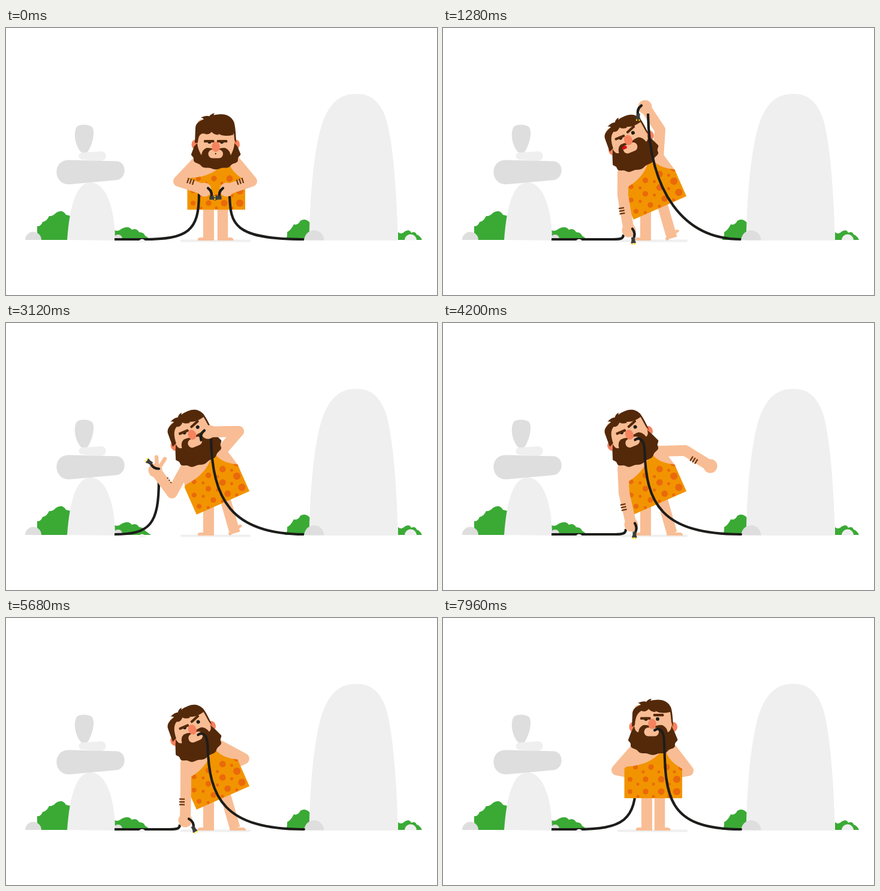
An HTML page with a canvas for the animation above (8 s loop, 719x446 px).

```html
<!DOCTYPE html>
<html lang="en">
<head>
<meta charset="utf-8">
<title>Caveman with cables</title>
<style>
html, body { margin: 0; width: 100%; height: 100%; overflow: hidden; background: #fff; }
canvas { display: block; width: 719px; height: 446px; }
</style>
</head>
<body>
<canvas></canvas>
<script>
const LOOP = 8000, GROUND = 353;
const SKIN = '#f8bd94', BLUSH = '#f5835f', HAIR = '#53290a', INK = '#1d1d1b', METAL = '#3c3c3b';
const TUNIC = '#f29400', SPOT = '#ea690b', BUSH = '#3aaa35', PALE = '#efefef', GREY = '#dedede';

const START = {
  lean: 0, down: 1, look: 0, eye: 0, tap: 0, fingers: 0, plugTurn: 1.25,
  elbowL: [288, 256], handL: [331, 270], elbowR: [410, 256], handR: [368, 270],
};
// Each move eases some properties to new values between two times.
const MOVES = [
  [150, 750, { lean: 1, down: 0, eye: 1, tap: 1, look: -3, plugTurn: 1.5,
    elbowL: [300, 280], handL: [310, 338], elbowR: [362, 170], handR: [337, 132] }],
  [1700, 2300, { look: 0, elbowR: [388, 181], handR: [337, 182] }],
  [2560, 2900, { fingers: 1, plugTurn: 3.75, elbowL: [277, 284], handL: [249, 246] }],
  [3380, 3750, { fingers: 0, tap: 0, plugTurn: 1.6, elbowL: [302, 284], handL: [314, 337] }],
  [3420, 3800, { look: 1, elbowR: [404, 178], handR: [440, 138] }],
  [3800, 4160, { elbowR: [404, 213], handR: [446, 239] }],
  [4240, 4700, { plugTurn: 1.1, elbowL: [300, 285], handL: [299, 338], elbowR: [397, 235], handR: [365, 250] }],
  [5950, 6450, { lean: 0, eye: 0, look: 0, elbowL: [290, 254], handL: [331, 262], elbowR: [409, 255], handR: [370, 262] }],
  [7500, 7850, { look: -2, eye: 1 }],
];

const canvas = document.querySelector('canvas');
const ctx = canvas.getContext('2d');
const ratio = window.devicePixelRatio || 1;
canvas.width = 719 * ratio;
canvas.height = 446 * ratio;

const mix = (a, b, k) => Array.isArray(a) ? a.map((v, i) => mix(v, b[i], k)) : a + (b - a) * k;
const between = (t, a, b) => t >= a && t < b;

function poseAt(t) {
  const pose = { ...START };
  for (const [from, to, changes] of MOVES) {
    const k = Math.min(1, Math.max(0, (t - from) / (to - from)));
    for (const name in changes) pose[name] = mix(pose[name], changes[name], k * k * (3 - 2 * k));
  }
  return pose;
}

function fill(path, color) {
  ctx.fillStyle = color;
  ctx.fill(new Path2D(path));
}
function stroke(path, color, width, cap = 'round') {
  Object.assign(ctx, { strokeStyle: color, lineWidth: width, lineCap: cap, lineJoin: 'round' });
  ctx.stroke(new Path2D(path));
}
function oval(x, y, rx, ry, color) {
  ctx.fillStyle = color;
  ctx.beginPath();
  ctx.ellipse(x, y, rx, ry, 0, 0, 7);
  ctx.fill();
}
function mound(x, y, r, color) {
  fill(`M${x - r} ${y}A${r} ${r} 0 0 1 ${x + r} ${y}Z`, color);
}
function box(x, y, w, h, r, color) {
  ctx.fillStyle = color;
  ctx.beginPath();
  ctx.roundRect(x, y, w, h, r);
  ctx.fill();
}

// A frame turned around a pivot that sits at (x, y) on the stage.
function frame(x, y, angle, pivotX, pivotY) {
  const cos = Math.cos(angle), sin = Math.sin(angle);
  return {
    point(px, py) {
      const dx = px - pivotX, dy = py - pivotY;
      return [x + dx * cos - dy * sin, y + dx * sin + dy * cos];
    },
    draw(part) {
      ctx.save();
      ctx.translate(x, y);
      ctx.rotate(angle);
      ctx.translate(-pivotX, -pivotY);
      part();
      ctx.restore();
    },
  };
}

function scenery() {
  fill('M52 354V331Q58 332 61 324Q68 323 72 314Q78 315 83 309Q94 302 100 312L108 314V354Z', BUSH);
  fill('M181 354V338Q188 340 192 336Q204 329 210 337Q218 334 222 341Q230 341 232 347L242 354Z', BUSH);
  fill('M465 354Q470 350 469 341Q476 337 480 328Q487 330 491 322Q499 317 507 325V354Z', BUSH);
  fill('M654 354V341Q660 346 665 340Q673 335 676 342Q683 339 685 345Q691 347 694 354Z', BUSH);
  mound(187, 352, 7, GREY);
  fill('M102 354C106 298 117 258 141 258C168 258 182 305 182 355Z', PALE);
  fill('M119 164C126 160 138 161 143 165C149 171 146 190 137 206C134 210 127 210 123 205C114 192 112 172 119 164Z', GREY);
  fill('M128 208L158 206C170 206 169 222 158 222L128 220C119 219 120 208 128 208Z', PALE);
  fill('M105 220.5L185 222.5C202 224 202 251 185 254L108 261C78 264 76 220 105 220.5Z', GREY);
  fill('M506 355C507 270 516 180 533 146C546 119 562 110 585 110C608 110 622 122 632 146C645 180 652 270 654 355Z', PALE);
  mound(45.5, 354, 13.5, GREY);
  mound(514, 354.5, 16.5, GREY);
  mound(675, 354.5, 10, PALE);
  box(291, 353.5, 117, 4, 2, PALE);
}

function legs({ lean, tap, down }) {
  const left = mix(340, 338, Math.max(lean, down));
  fill(`M${left - 9} 285H${left + 9}V355H${left - 18}Q${left - 19} 350 ${left - 14} 350H${left - 9}Z`, SKIN);
  const ankle = mix(361.5, 382, lean);
  stroke(`M${mix(361.5, 364.5, lean)} 290L${ankle} 351`, SKIN, 17.5, 'butt');
  frame(ankle - 8, 355, -.66 * tap, 0, 0).draw(() => fill('M-.7 0V-5H21Q26 -5 26 0Z', SKIN));
}

function tunic() {
  const cloth = 'M302.5 301V254Q302 249 308 248Q345 246 365 222H372Q376 239 399 252V301Z';
  fill(cloth, TUNIC);
  ctx.save();
  ctx.clip(new Path2D(cloth));
  for (let row = 0; row < 3; row++) {
    for (let col = 0; col < 4; col++) {
      const x = 312 + 26 * col + (row ? 0 : 9), y = 249 + 20.5 * row, r = 4 + .7 * col;
      oval(x, y, r, r, SPOT);
      oval(x + 13, y + 8, 2.5, 2.5, SPOT);
    }
  }
  ctx.restore();
}

function arm(points) {
  const [x, y] = points[points.length - 1];
  stroke('M' + points.join('L'), SKIN, 18);
  oval(x, y, 11.5, 11.5, SKIN);
}

// Three stripes across the forearm, pushed to one side of it.
function bands([ex, ey], [hx, hy], side, length) {
  const turn = Math.atan2(hy - ey, hx - ex), at = .42 * Math.hypot(hx - ex, hy - ey);
  frame(ex, ey, turn, 0, 0).draw(() => {
    for (const i of [-1, 0, 1]) stroke(`M${at + 4.6 * i} ${side - length / 2}v${length}`, '#6b3610', 2.3, 'butt');
  });
}

// Lower beard edge: an ellipse with small waves.
function beardEdge() {
  let path = '';
  for (let a = 0; a <= Math.PI; a += .05) {
    const r = 1 + .035 * Math.cos(a * 12);
    path += `L${350 + 40 * r * Math.cos(a)} ${203 + 25 * r * Math.sin(a)}`;
  }
  return path;
}

function head(t, { lean, down, look, eye }) {
  const face = 14 * down - 1.2 * lean, ear = 5 * down, left = 315 - 2.5 * lean;
  oval(316 - look / 2, 182 + ear, 6.5, 8, BLUSH);
  oval(383.5 - look / 2, 182 + ear, 6.5, 8, BLUSH);
  box(319, 145, 62, 65, 8, SKIN);
  fill(`M319 ${180 + ear}Q320 ${190 + ear} 326 ${191 + face}Q327 ${182 + face} 334 ${179 + face}
    Q342 ${178 + face} 350 ${183 + face}Q358 ${178 + face} 366 ${179 + face}Q373 ${182 + face} 375 ${191 + face}
    Q381 ${188 + ear} 381 ${180 + ear}L386 190${beardEdge()}L314 190Z`, HAIR);
  fill(`M${left} ${182 + ear / 2}L${left + 1} 160C${left + 1} 152 ${left + 7} 148 330 145Q328 142 325 142Q334 138 339 140
    Q343 135 348 135L346 138Q372 132 380 149Q383 156 384 ${182 + ear / 2}L381 ${174 + ear}Q380 162 379 ${157 + face}
    Q364 ${161 + face} 354 ${155 + face}L355 ${157 + face}Q347 ${157 + face} 343 ${152 + face}
    Q338 ${158 + face} 331 ${155 + face}Q321 ${160 + face / 2} 320 ${179 + ear}Z`, HAIR);

  const shift = look / 2;
  oval(339.5 + shift, 168.8 + face, 3, 3, INK);
  oval(360 + look + 3.5 * lean, 168.8 + face, 3, 3, INK);
  box(330 + shift, 165.5 + face, 17.5, 4.2, 1.5, HAIR);
  frame(360.5 + shift, 167.6 + face - 5.5 * eye, -.35 * lean, 0, 0)
    .draw(() => box(-8.7, -2.1, 17.5, 4.2, 1.5, HAIR));

  box(337.5 + look, 183 + face * .9, 24.5, 14.5, 7, SKIN);
  oval(350 + shift, 177 + face, 6.8, 8.5, BLUSH);
  if (t < 500) oval(349.7, 188.5 + face, 1, 1.3, INK);
  if (between(t, 900, 1900)) box(334, 182.5, 8, 5, 2.5, '#e30613');
}

// A bent cable end held in the hand; side is 1 for the left hand, -1 for the right.
function plug([hx, hy], side, turn, heading, hasTip) {
  const x = hx + 6 * side, y = hy - 2.5, dx = 17 * Math.cos(turn), dy = 17 * Math.sin(turn);
  const bend = .35 * side;
  stroke(`M${x} ${y}q${dx / 2 + dy * bend} ${dy / 2 - dx * bend} ${dx} ${dy}`, INK, 4.2);
  if (!hasTip) return;
  frame(x + dx, y + dy, heading, 0, 0).draw(() => {
    stroke('M6 -2.2H9.5M6 2.2H9.5', '#ffde00', 2, 'butt');
    fill('M-3 -3L3 -3L7 -4.5V4.5L3 3H-3Z', METAL);
  });
}

// Runs along the ground, then curves up to the left hand.
function leftCable({ handL, fingers }) {
  const x = handL[0] - 9 + 15 * fingers, y = handL[1] + 7 + 9 * fingers, h = GROUND - y;
  const span = Math.min(x - 181, 9 + 1.1 * h);
  stroke(`M181 ${GROUND}H${x - span}C${x - .2 * span} ${GROUND} ${x} ${GROUND - .18 * h} ${x} ${y}`, INK, 4.2, 'butt');
}

// Hangs from the right hand, or from the mouth once plugged in.
function rightCable({ handR }, mouth) {
  const [x, y] = mouth ? [mouth[0] + 16, mouth[1] + 18] : [handR[0] + 5, handR[1] + 11];
  const hook = mouth ? `${mouth}C${mouth[0] + 5} ${mouth[1] - 4} ${x - 1} ${y - 22} ${x} ${y}` : `${x} ${y}`;
  const slack = Math.max(x + 4, 477 - .533 * y);
  stroke(`M${hook}C${x + 2} ${mix(y, GROUND, .62)} ${slack} ${GROUND} 497 ${GROUND}`, INK, 4.2, mouth ? 'round' : 'butt');
}

function draw(t) {
  const pose = poseAt(t);
  const { lean, down, look, fingers, elbowL, handL, elbowR, handR, plugTurn } = pose;
  const plugged = t >= 3400, handsBack = t > 6200;
  const body = frame(mix(350.75, 362, lean), mix(301 + 2.5 * down, 300.5, lean), -.417 * lean, 350.75, 301);
  const skull = frame(mix(349.7, 312.5, lean), mix(182 + 7.5 * down, 192.5, lean), -.393 * lean, 349.7, 182);

  const leftSide = () => {
    leftCable(pose);
    arm([body.point(318, 222), elbowL, handL]);
    if (!handsBack) bands(elbowL, handL, mix(-6, 6, lean) + 3 * fingers, mix(9, 2, fingers));
    const [x, y] = handL;
    if (fingers > 0) stroke(`M${x + 3} ${y - 6}l${-fingers} ${-16 * fingers}M${x + 7} ${y - 5}l${9 * fingers} ${-14 * fingers}`, SKIN, 6.5);
  };
  const rightSide = () => {
    arm([body.point(383, 221), elbowR, handR]);
    if (t < 350 || between(t, 3700, 4450)) bands(elbowR, handR, 6, 9);
  };

  ctx.setTransform(ratio, 0, 0, ratio, 0, 0);
  ctx.fillStyle = '#fff';
  ctx.fillRect(0, 0, 719, 446);
  scenery();
  if (handsBack) leftSide();
  legs(pose);
  body.draw(() => fill('M313 214Q315 208 325 208H378Q388 208 392 222L399 253V262H303V252Z', SKIN));
  if (t > 350) rightSide();
  body.draw(tunic);
  if (t <= 350) rightSide();
  if (!handsBack) leftSide();
  mound(227, 358, 5.5, '#f4f4f4');

  skull.draw(() => head(t, pose));
  if (between(t, 1900, 3600)) arm([elbowR, handR]);
  rightCable(pose, plugged && skull.point(355 + look, 187.5));
  if (!handsBack) plug(handL, 1, plugTurn, plugTurn * (1 - down), true);
  if (!plugged) plug(handR, -1, 1.9, mix(1.6, Math.PI, down), t < 2250);
}

function tick(now) {
  draw(now % LOOP);
  requestAnimationFrame(tick);
}
draw(0);
requestAnimationFrame(tick);
</script>
</body>
</html>
```
